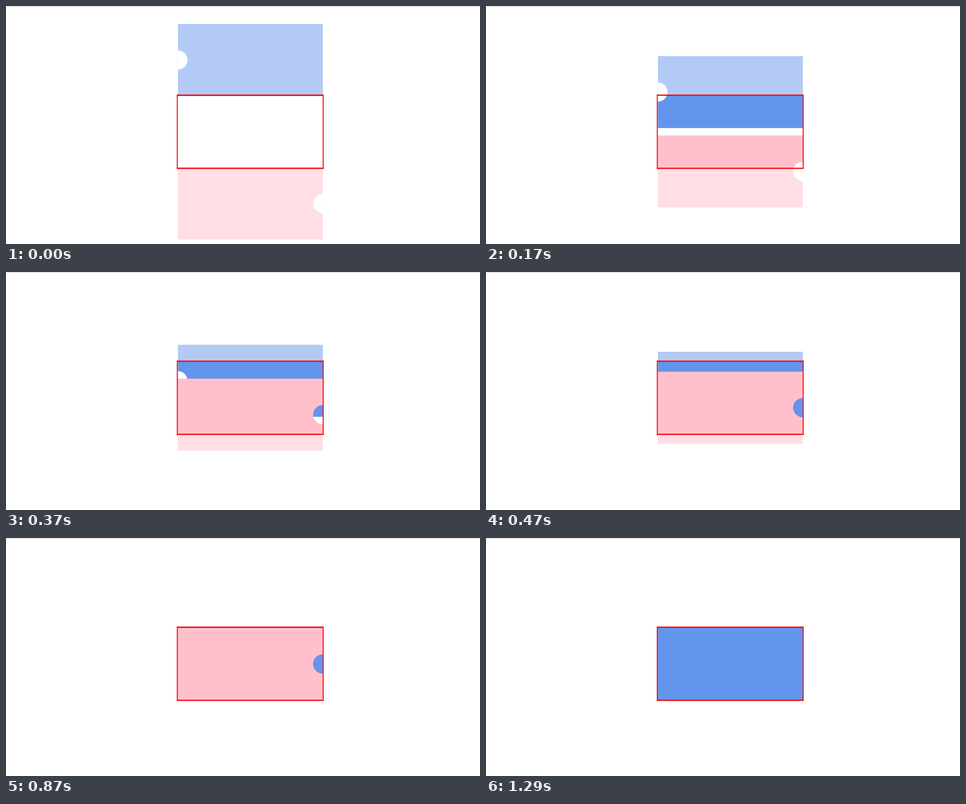
These frames come from a looping animation (1055x531 px, 2.09 s). An HTML page with a canvas:

```html
<!DOCTYPE html>
<html lang="en">
<head>
<meta charset="utf-8">
<style>
  html, body { margin: 0; width: 100%; height: 100%; overflow: hidden; background: #fff; }
  canvas { display: block; }
</style>
</head>
<body>
<canvas id="stage" width="1055" height="531"></canvas>
<script>
const ctx = document.getElementById('stage').getContext('2d');
const LOOP = 2090;
const BOX = { x: 382, y: 200, w: 323, h: 161 };
const TRAVEL = 160;
const BLUE = [100, 149, 236], PINK = [255, 192, 203], GRAY = [201, 201, 201];

const rgb = c => `rgb(${c.join()})`;
const mix = (a, b, k) => a.map((v, i) => Math.round(v + (b[i] - v) * k));

// The motion is stepped, about twenty poses a second.
function stepTime(t) {
  if (t < 30) return 0;
  if (t < 70) return 30;
  const start = t < 730 ? 70 : 730;
  return Math.min(start + 50 * Math.floor((t - start) / 50), start === 70 ? 670 : LOOP);
}

// Distance still to go, with a cubic ease-out.
function distance(t) {
  const s = stepTime(t);
  const u = s === 0 ? 0 : Math.min(1, (s + 7) / 988);
  return TRAVEL * (1 - u) ** 3;
}

// A card with a round notch cut into one side.
function card(x, y, notchX, color) {
  ctx.beginPath();
  ctx.rect(x, y, 705.5 - x, BOX.h);
  ctx.moveTo(notchX + 21.5, y + 80.5);
  ctx.arc(notchX, y + 80.5, 21.5, 0, Math.PI * 2);
  ctx.save();
  ctx.clip('evenodd');
  ctx.fillStyle = rgb(color);
  ctx.fillRect(x, y, 705.5 - x, BOX.h);
  ctx.restore();
}

function veilOutside() {
  ctx.beginPath();
  ctx.rect(0, 0, 1055, 531);
  ctx.rect(BOX.x, BOX.y, BOX.w, BOX.h);
  ctx.fillStyle = 'rgba(255,255,255,0.5)';
  ctx.fill('evenodd');
}

function border() {
  ctx.fillStyle = '#fc0006';
  ctx.fillRect(380.2, 197.6, 326.8, 2.8);
  ctx.fillRect(380.2, 360.8, 326.8, 2.7);
  ctx.fillRect(380.2, 197.6, 2.1, 165.9);
  ctx.fillRect(704.9, 197.6, 2.1, 165.9);
}

function draw(t) {
  ctx.fillStyle = '#fff';
  ctx.fillRect(0, 0, 1055, 531);

  if (t < 1240) {
    const d = distance(t);
    const toGray = t < 970 ? 0 : t < 1020 ? 0.5 : 1;
    card(382.4, BOX.y - d, 382.5, BLUE);
    card(382, BOX.y + d, 705, mix(PINK, GRAY, toGray));
  } else {
    ctx.fillStyle = rgb(BLUE);
    ctx.fillRect(BOX.x, BOX.y, BOX.w, BOX.h);
    if (t < 1290) card(382, BOX.y, 705, mix(GRAY, BLUE, 0.5));
  }

  veilOutside();
  border();
  ctx.fillStyle = '#c4c4c4';
  ctx.fillRect(0, 0, 1055, 1);
}

let begin;
function tick(now) {
  begin ??= now;
  draw((now - begin) % LOOP);
  requestAnimationFrame(tick);
}
draw(0);
requestAnimationFrame(tick);
</script>
</body>
</html>
```
